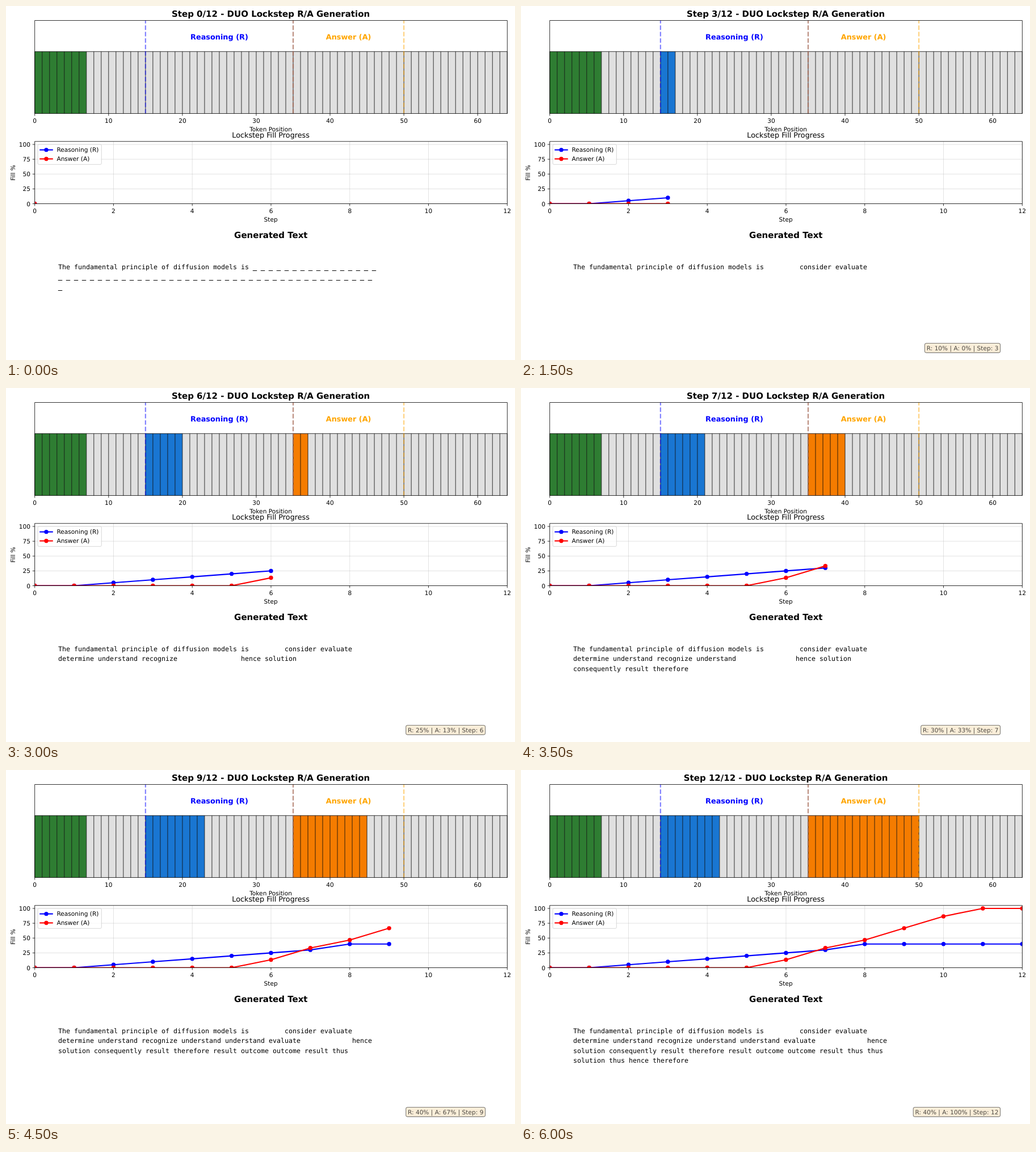
An HTML page that plays this animation: 897 by 624 pixels, repeating every 6500 ms.

```html
<!DOCTYPE html>
<html lang="en">
<head>
<meta charset="utf-8">
<title>DUO Lockstep R/A Generation</title>
<style>
  html, body { margin: 0; width: 100%; height: 100%; overflow: hidden; background: #fff; }
  svg { display: block; width: 897px; height: 624px; }
  text { font: 10.6px "DejaVu Sans", sans-serif; white-space: pre; text-rendering: geometricPrecision; }
  .title { font-size: 12.8px; }
  .label { font-size: 12.85px; font-weight: bold; }
  .head { font-size: 15px; font-weight: bold; }
  .mono { font: 11.63px "DejaVu Sans Mono", monospace; }
  .blank { stroke: #000; stroke-width: .4; }
  .mid { text-anchor: middle; }
  .end { text-anchor: end; }
  .thin { stroke: #000; fill: none; stroke-width: .8; }
  .grid { stroke: #b0b0b0; stroke-opacity: .35; }
  .dash { stroke-width: 2.14; stroke-opacity: .5; stroke-dasharray: 7.92 3.42; }
  .series { fill: none; stroke-width: 2.14; stroke-linecap: square; stroke-linejoin: round; }
</style>
</head>
<body>
<svg id="stage" viewBox="0 0 897 624"></svg>
<script>
const stage = document.getElementById('stage');
const STEP_MS = 500, STEPS = 12, TOKENS = 64, WRAP = 80;
const LEFT = 50.7, RIGHT = 883.3, WIDTH = RIGHT - LEFT;
const STRIP_TOP = 25.6, STRIP_BOTTOM = 189.6, BAR_TOP = 80.3;
const PLOT_TOP = 238.8, PLOT_BOTTOM = 348.5;
const R_START = 15, R_LEN = 20, A_START = 35, A_LEN = 15;
const BLUE = '#0000ff', RED = '#ff0000', ORANGE = '#ffa500';

const prompt = 'The fundamental principle of diffusion models is'.split(' ');
const reasons = 'consider evaluate determine understand recognize understand understand evaluate'.split(' ');
const answers = ('hence solution consequently result therefore result outcome outcome ' +
  'result thus thus solution thus hence therefore').split(' ');
const answerCounts = [0, 0, 0, 0, 0, 0, 2, 5, 7, 10, 13, 15, 15];

const rCount = s => s < 8 ? Math.max(0, s - 1) : 8;
const aCount = s => answerCounts[s];
const rPct = s => rCount(s) / R_LEN * 100;
const aPct = s => aCount(s) / A_LEN * 100;

const tokenX = i => LEFT + WIDTH * i / TOKENS;
const stepX = s => LEFT + WIDTH * s / STEPS;
const pctY = p => PLOT_BOTTOM - (PLOT_BOTTOM - PLOT_TOP) * p / 105;

function add(tag, attrs, parent = stage) {
  const el = document.createElementNS('http://www.w3.org/2000/svg', tag);
  for (const k in attrs) el.setAttribute(k, attrs[k]);
  parent.appendChild(el);
  return el;
}
function text(str, x, y, cls = '', attrs = {}) {
  const el = add('text', { x, y, class: cls, ...attrs });
  el.textContent = str;
  return el;
}
const line = (x1, y1, x2, y2, cls, attrs = {}) => add('line', { x1, y1, x2, y2, class: cls, ...attrs });
const dot = (cx, cy, fill, parent) => add('circle', { cx, cy, r: 3.7, fill }, parent);
const frame = (top, bottom, cls, parent) =>
  add('rect', { x: LEFT, y: top, width: WIDTH, height: bottom - top, class: cls }, parent);

function xTick(x, y, label) {
  line(x, y, x, y + 3.9, 'thin');
  text(label, x, y + 16.8, 'mid');
}

// Token strip
const bars = Array.from({ length: TOKENS }, (_, i) =>
  add('rect', { x: tokenX(i), y: BAR_TOP, width: WIDTH / TOKENS, height: STRIP_BOTTOM - BAR_TOP }));
for (let i = 0; i <= TOKENS; i++) line(tokenX(i), BAR_TOP, tokenX(i), STRIP_BOTTOM, 'thin');
line(LEFT, BAR_TOP, RIGHT, BAR_TOP, 'thin');
[[R_START, BLUE], [A_START, BLUE], [A_START, ORANGE], [A_START + A_LEN, ORANGE]].forEach(([i, stroke]) =>
  line(tokenX(i), STRIP_BOTTOM, tokenX(i), STRIP_TOP, 'dash', { stroke }));
text('Reasoning (R)', tokenX(25), 58.6, 'label mid', { fill: BLUE });
text('Answer (A)', tokenX(42.5), 58.6, 'label mid', { fill: ORANGE });
frame(STRIP_TOP, STRIP_BOTTOM, 'thin');
for (let i = 0; i < TOKENS; i += 10) xTick(tokenX(i), STRIP_BOTTOM, i);
text('Token Position', 466.6, 221.2, 'mid');
const title = text('', 466.6, 19.4, 'head mid');

// Progress chart
for (let s = 0; s <= STEPS; s += 2) line(stepX(s), PLOT_TOP, stepX(s), PLOT_BOTTOM, 'grid');
for (let p = 0; p <= 100; p += 25) line(LEFT, pctY(p), RIGHT, pctY(p), 'grid');
frame(PLOT_TOP, PLOT_BOTTOM, '', add('clipPath', { id: 'plot' }));
const plot = add('g', { 'clip-path': 'url(#plot)' });
const series = [[rPct, BLUE], [aPct, RED]].map(([pct, color]) => {
  const path = add('polyline', { class: 'series', stroke: color }, plot);
  const dots = Array.from({ length: STEPS + 1 }, (_, s) => dot(stepX(s), pctY(pct(s)), color, plot));
  return { pct, path, dots };
});
frame(PLOT_TOP, PLOT_BOTTOM, 'thin');
for (let s = 0; s <= STEPS; s += 2) xTick(stepX(s), PLOT_BOTTOM, s);
for (let p = 0; p <= 100; p += 25) {
  line(LEFT - 3.9, pctY(p), LEFT, pctY(p), 'thin');
  text(p, 43.1, pctY(p) + 4, 'end');
}
text('Lockstep Fill Progress', 466.6, 232.4, 'title mid');
text('Step', 466.6, 379.5, 'mid');
text('Fill %', 0, 0, 'mid', { transform: 'translate(15.8 294) rotate(-90)' });

add('rect', { x: 56, y: 244, width: 112.3, height: 35.3, rx: 2.1, fill: '#fff', 'fill-opacity': .8,
  stroke: '#ccc', 'stroke-opacity': .8 });
[['Reasoning (R)', BLUE, 253.6], ['Answer (A)', RED, 269.5]].forEach(([name, color, y]) => {
  line(60.3, y, 81.7, y, 'series', { stroke: color });
  dot(71, y, color);
  text(name, 89.4, y + 3.8);
});

// Generated text and status badge
text('Generated Text', 466.8, 408.8, 'head mid');
const rows = Array.from({ length: 5 }, (_, i) => text('', 92.1, 463.8 + 17.35 * i, 'mono'));
const badge = add('g', {});
const badgeBox = add('rect', { y: 594.5, height: 16.6, rx: 3.2, fill: '#f5deb3', 'fill-opacity': .5,
  stroke: '#000', 'stroke-opacity': .5, 'stroke-width': 1.07 }, badge);
const badgeText = text('', 841.4, 606.5, 'end', { 'fill-opacity': .7 });
badge.appendChild(badgeText);

function tokenAt(i, s) {
  if (i < prompt.length) return { word: prompt[i], color: '#2e7d32' };
  if (i >= R_START && i < R_START + rCount(s)) return { word: reasons[i - R_START], color: '#1976d2' };
  if (i >= A_START && i < A_START + aCount(s)) return { word: answers[i - A_START], color: '#f57c00' };
  return { word: s ? '' : '_', color: '#e0e0e0' };
}

function wrap(str) {
  const out = [];
  let row = '';
  for (const chunk of str.match(/\s+|\S+/g)) {
    if (row.length + chunk.length > WRAP) {
      out.push(row);
      row = '';
    }
    row += row ? chunk : chunk.trim();
  }
  return [...out, row];
}

function show(s) {
  const tokens = bars.map((_, i) => tokenAt(i, s));
  bars.forEach((bar, i) => bar.setAttribute('fill', tokens[i].color));
  title.textContent = `Step ${s}/${STEPS} - DUO Lockstep R/A Generation`;

  for (const { pct, path, dots } of series) {
    const points = dots.slice(0, s + 1).map((_, i) => `${stepX(i)},${pctY(pct(i))}`);
    path.setAttribute('points', points.join(' '));
    dots.forEach((d, i) => d.setAttribute('visibility', i <= s ? 'visible' : 'hidden'));
  }

  const wrapped = wrap(tokens.map(t => t.word).join(' '));
  rows.forEach((row, i) => {
    row.innerHTML = (wrapped[i] || '').replace(/_[_ ]*/, '<tspan class="blank">$&</tspan>');
  });

  badge.setAttribute('visibility', s ? 'visible' : 'hidden');
  badgeText.textContent = `R: ${Math.round(rPct(s))}% | A: ${Math.round(aPct(s))}% | Step: ${s}`;
  const w = badgeText.getComputedTextLength() + 6.4;
  badgeBox.setAttribute('x', 844.6 - w);
  badgeBox.setAttribute('width', w);
}

let start, shown = 0;
show(0);
function tick(now) {
  start ??= now;
  const s = Math.floor((now - start) / STEP_MS) % (STEPS + 1);
  if (s !== shown) show(shown = s);
  requestAnimationFrame(tick);
}
requestAnimationFrame(tick);
</script>
</body>
</html>
```
